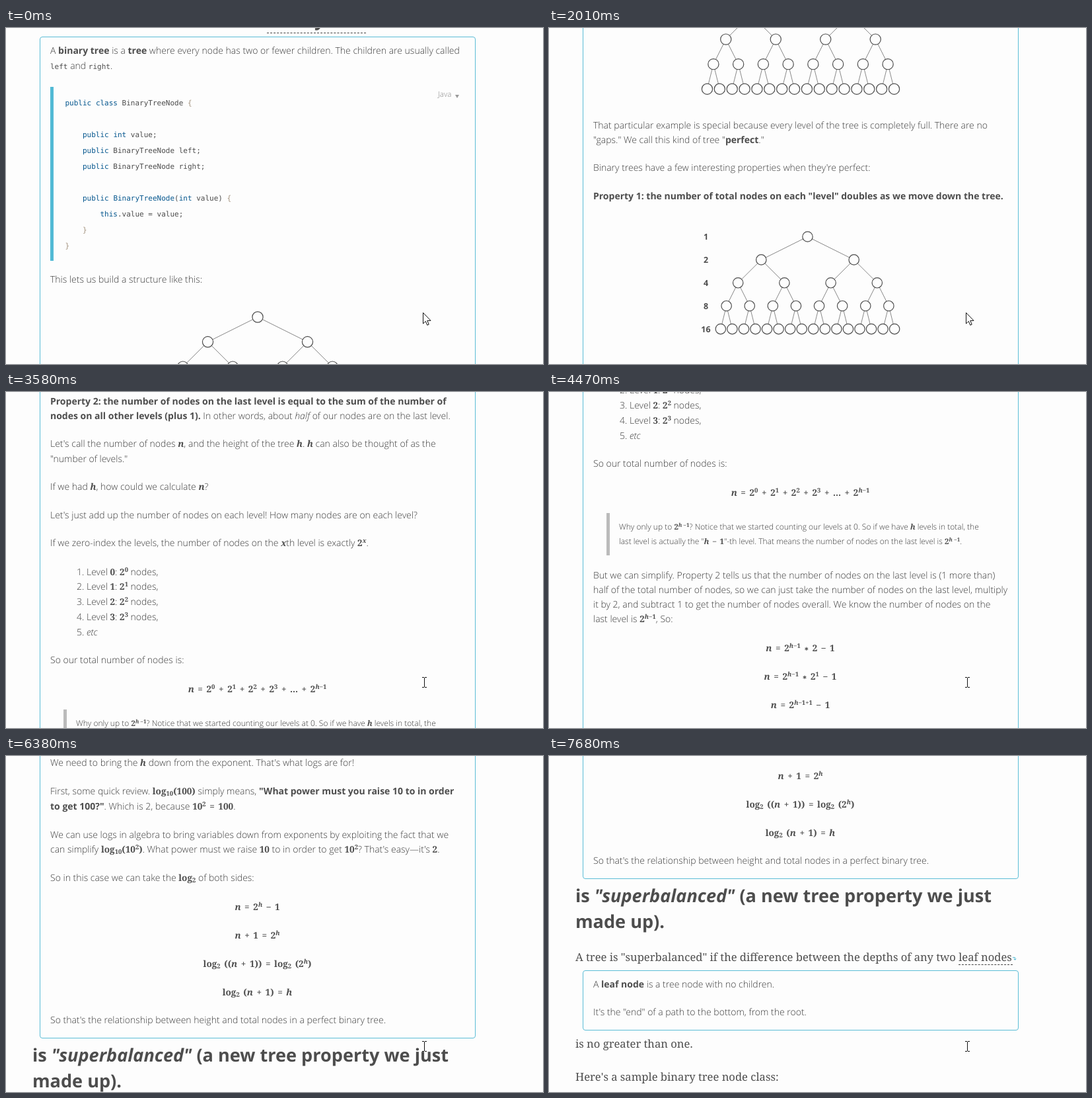
Animation, 813 px wide and 508 px high, one loop 8000 ms. Source, as an HTML page:

```html
<!DOCTYPE html>
<html lang="en">
<head>
<meta charset="utf-8">
<title>Binary tree article</title>
<style>
html, body { margin: 0; width: 100%; height: 100%; overflow: hidden; background: #fdfdfd; }
body { position: relative; color: #4d4d4d; text-rendering: geometricPrecision; }
#doc { position: absolute; left: 0; top: 0; width: 813px; }
#doc > div, svg { position: absolute; }
svg { left: 0; top: 0; overflow: visible; }
.text { font: 300 14px/20px 'Open Sans', sans-serif; color: #3c3c3c; white-space: pre; }
.text b { font-weight: 700; color: #4d4d4d; }
.text.aside { font-size: 12px; }
.text.head { font-size: 27.1px; font-weight: 700; color: #4d4d4d; }
.text.serif { font: 400 16.6px/20px 'Noto Serif', serif; color: #4d4d4d; }
.text.code, .text code { font: 11px/20px 'DejaVu Sans Mono', monospace; color: #4d4d4d; }
.code em { font-style: normal; color: #07588f; }
.code s { text-decoration: none; color: #a3937f; }
.eq { left: 0; width: 761px; text-align: center; }
.math { font: 600 .97em 'Noto Serif', serif; line-height: 0; word-spacing: .15em; color: #4d4d4d; }
.math sup, .math sub { font-size: .7em; line-height: 0; word-spacing: 0; }
.math sup { vertical-align: .5em; }
.math sub { vertical-align: -.25em; }
.math small { font-size: .6em; line-height: 0; vertical-align: .1em; }
.text.label { left: 217px; width: 41px; text-align: center; font-size: 12.5px; font-weight: 700; color: #4d4d4d; }
.box { left: 51px; width: 658px; border: 1px solid #5bbdd6; border-radius: 4px; }
.dashed { border-top: 1px dashed #444; }
</style>
</head>
<body>
<div id="doc"></div>
<svg id="arrow" width="1" height="1"><path d="M.5 .5V17L4.3 13.4 6.8 19.3 9.2 18.2 6.8 12.4H12Z" fill="#fff" stroke="#111"/></svg>
<svg id="beam" width="1" height="1"><path d="M-3 -7.5H0M1 -7.5H4M.5 -7V7M-3 7.5H0M1 7.5H4" fill="none" stroke="#111"/></svg>
<script>
const doc = document.getElementById('doc');
const LOOP = 8000;

function add(cls, style, html = '') {
  doc.insertAdjacentHTML('beforeend', `<div class="${cls}" style="${style}">${html}</div>`);
}

// $...$ is math, with ^{} and _{} for scripts
const math = s => s.replace(/\$(.+?)\$/g, (_, m) => '<span class="math">' + m
  .replace(/\b[nhx]\b/g, '<i>$&</i>')
  .replace(/∗/g, '<small>∗</small>')
  .replace(/\^\{(.+?)\}/g, '<sup>$1</sup>')
  .replace(/_\{(.+?)\}/g, '<sub>$1</sub>') + '</span>');

const line = (x, y, html, cls = '') =>
  add('text ' + cls, `top:${y - 10}px;${x === null ? '' : `left:${x}px`}`, math(html));

// Each row is "y text"; y counts from the given offset
function lines(offset, x, rows, cls) {
  for (const row of rows.trim().split('\n')) {
    const [, y, html] = row.match(/^\s*(\S+) (.*)$/);
    line(x, offset + +y, html, cls);
  }
}
const equations = (offset, rows) =>
  lines(offset, null, rows.replace(/^(\s*\S+) (.*)$/gm, '$1 $$$2$$'), 'eq');

const rect = (x, y, w, h, color) =>
  add('', `left:${x}px;top:${y}px;width:${w}px;height:${h}px;background:${color}`);
const box = (top, bottom) => add('box', `top:${top}px;height:${bottom - top - 1}px`);
const dashed = (x, y, w) => add('dashed', `left:${x}px;top:${y}px;width:${w}px`);
const svg = body => doc.insertAdjacentHTML('beforeend', `<svg width="1" height="1">${body}</svg>`);

function tree(cx, top, gap, rowHeight, r) {
  let edges = '', nodes = '';
  const place = (level, i) => [cx + ((i + .5) * 2 ** (4 - level) - 8) * gap, top + level * rowHeight];
  for (let level = 0; level < 5; level++) {
    for (let i = 0; i < 2 ** level; i++) {
      const [x, y] = place(level, i);
      if (level) edges += `M${place(level - 1, i >> 1)}L${x},${y}`;
      nodes += `<circle cx="${x}" cy="${y}" r="${r}"/>`;
    }
  }
  svg(`<path d="${edges}" fill="none" stroke="#888"/><g fill="#fdfdfd" stroke="#4d4d4d" stroke-width="1.2">${nodes}</g>`);
}

line(395, -13.5, 'binary tree', 'head');
dashed(395, 7, 150);
box(13, 2310);

lines(0, 67, `
  35 A <b>binary tree</b> is a <b>tree</b> where every node has two or fewer children. The children are usually called
  57.5 <code>left</code> and <code>right</code>.
  381 This lets us build a structure like this:`);

rect(67, 89, 5, 263, '#52bad5');
add('', 'left:654px;top:91px;font:300 11.5px/20px Open Sans,sans-serif;color:#888', 'Java');
svg('<path d="M680 101H686L683 106Z" fill="#999"/>');
`public class BinaryTreeNode {

    public int value;
    public BinaryTreeNode left;
    public BinaryTreeNode right;

    public BinaryTreeNode(int value) {
        this.value = value;
    }
}`.split('\n').forEach((code, i) => line(89.5, 114 + 24 * i, code.replace(
  /\b(public|class|int|this)\b|BinaryTreeNode(?=\()|[{}]/g,
  m => /[{}]/.test(m) ? `<s>${m}</s>` : `<em>${m}</em>`), 'code'));

tree(381, 437, 18.87, 37.55, 8.1);

lines(240, 67, `
  403 That particular example is special because every level of the tree is completely full. There are no
  425 "gaps." We call this kind of tree "<b>perfect</b>."
  467 Binary trees have a few interesting properties when they're perfect:
  509.5 <b>Property 1: the number of total nodes on each "level" doubles as we move down the tree.</b>`);

tree(391.5, 810.5, 17.55, 34.9, 7.7);
for (let i = 0; i < 5; i++) line(null, 811 + 34.9 * i, String(2 ** i), 'label');

lines(750, 67, `
  261 <b>Property 2: the number of nodes on the last level is equal to the sum of the number of</b>
  283 <b>nodes on all other levels (plus 1).</b> In other words, about <i>half</i> of our nodes are on the last level.
  325 Let's call the number of nodes $n$, and the height of the tree $h$. $h$ can also be thought of as the
  348 "number of levels."
  390 If we had $h$, how could we calculate $n$?
  433 Let's just add up the number of nodes on each level! How many nodes are on each level?
  475 If we zero-index the levels, the number of nodes on the $x$th level is exactly $2^{x}$.`);

for (let i = 0; i < 4; i++) line(107, 1268.5 + 22.8 * i, `${i + 1}. Level $${i}$: $2^{${i}}$ nodes,`);
line(107, 1360, '5. <i>etc</i>');

lines(1293, 67, `
  109 So our total number of nodes is:
  278 But we can simplify. Property 2 tells us that the number of nodes on the last level is (1 more than)
  300 half of the total number of nodes, so we can just take the number of nodes on the last level, multiply
  322 it by 2, and subtract 1 to get the number of nodes overall. We know the number of nodes on the
  344 last level is $2^{h−1}$, So:`);
rect(87, 1476, 5, 64, '#bbb');
lines(1293, 106, `
  204 Why only up to $2^{h −1}$? Notice that we started counting our levels at 0. So if we have $h$ levels in total, the
  226 last level is actually the "$h − 1$"-th level. That means the number of nodes on the last level is $2^{h −1}$.`, 'aside');
equations(1293, `
  153 n = 2^{0} + 2^{1} + 2^{2} + 2^{3} + ... + 2^{h−1}
  388 n = 2^{h−1} ∗ 2 − 1
  431 n = 2^{h−1} ∗ 2^{1} − 1
  474 n = 2^{h−1+1} − 1
  517 n = 2^{h} − 1`);

lines(1645, 67, `
  207 So that's how we can go from $h$ to $n$. What about the other direction?
  250 We need to bring the $h$ down from the exponent. That's what logs are for!
  293 First, some quick review. $log_{10}(100)$ simply means, <b>"What power must you raise 10 to in order</b>
  316 <b>to get 100?"</b>. Which is 2, because $10^{2} = 100$.
  359 We can use logs in algebra to bring variables down from exponents by exploiting the fact that we
  381 can simplify $log_{10}(10^{2})$. What power must we raise $10$ to in order to get $10^{2}$? That's easy—it's $2$.
  424 So in this case we can take the $log_{2}$ of both sides:
  639 So that's the relationship between height and total nodes in a perfect binary tree.`);
equations(1884, `
  229 n = 2^{h} − 1
  272 n + 1 = 2^{h}
  315 log_{2} ((n + 1)) = log_{2} (2^{h})
  358 log_{2} (n + 1) = h`);

lines(1884, 40, `
  452 is <i>"superbalanced"</i> (a new tree property we just
  491 made up).`, 'head');
lines(2125, 40, `
  304 A tree is "superbalanced" if the difference between the depths of any two leaf nodes
  435 is no greater than one.
  485 Here's a sample binary tree node class:`, 'serif');
dashed(620, 2440, 82);
svg('<path d="M702 2429.5H705.5V2433M703.5 2431.5L705.5 2433.5 707.5 2431.5" fill="none" stroke="#5bbdd6"/>');
box(2449, 2539);
lines(2125, 67, `
  346 A <b>leaf node</b> is a tree node with no children.
  388 It's the "end" of a path to the bottom, from the root.`);

// Stepped scrolling: first step, last step, step count, scroll position reached
const moves = [
  [120, 670, 4, 120], [1080, 1350, 3, 240], [1500, 2010, 5, 495], [2160, 2700, 5, 750],
  [2950, 3190, 3, 873], [3310, 4350, 9, 1243], [4470, 5430, 8, 1645], [5550, 5670, 2, 1765],
  [6110, 6380, 3, 1884], [6500, 7140, 5, 2005], [7290, 7680, 4, 2125]
];

function scrollAt(t) {
  let y = 0;
  for (const [start, end, steps, to] of moves) {
    if (t < start) break;
    const done = Math.min(steps, Math.floor((t - start) / (end - start) * (steps - 1) + 1e-6) + 1);
    y += (to - y) * done / steps;
  }
  return Math.round(y);
}

const arrow = document.getElementById('arrow'), beam = document.getElementById('beam');

function draw() {
  const t = performance.now() % LOOP;
  const overText = t >= 3310;
  doc.style.transform = `translateY(${-scrollAt(t)}px)`;
  arrow.style.transform = `translate(631px, ${t < 2160 ? 430 : 433}px)`;
  arrow.style.display = overText ? 'none' : '';
  beam.style.transform = 'translate(633px, 439px)';
  beam.style.display = overText ? '' : 'none';
  requestAnimationFrame(draw);
}
draw();
</script>
</body>
</html>
```
